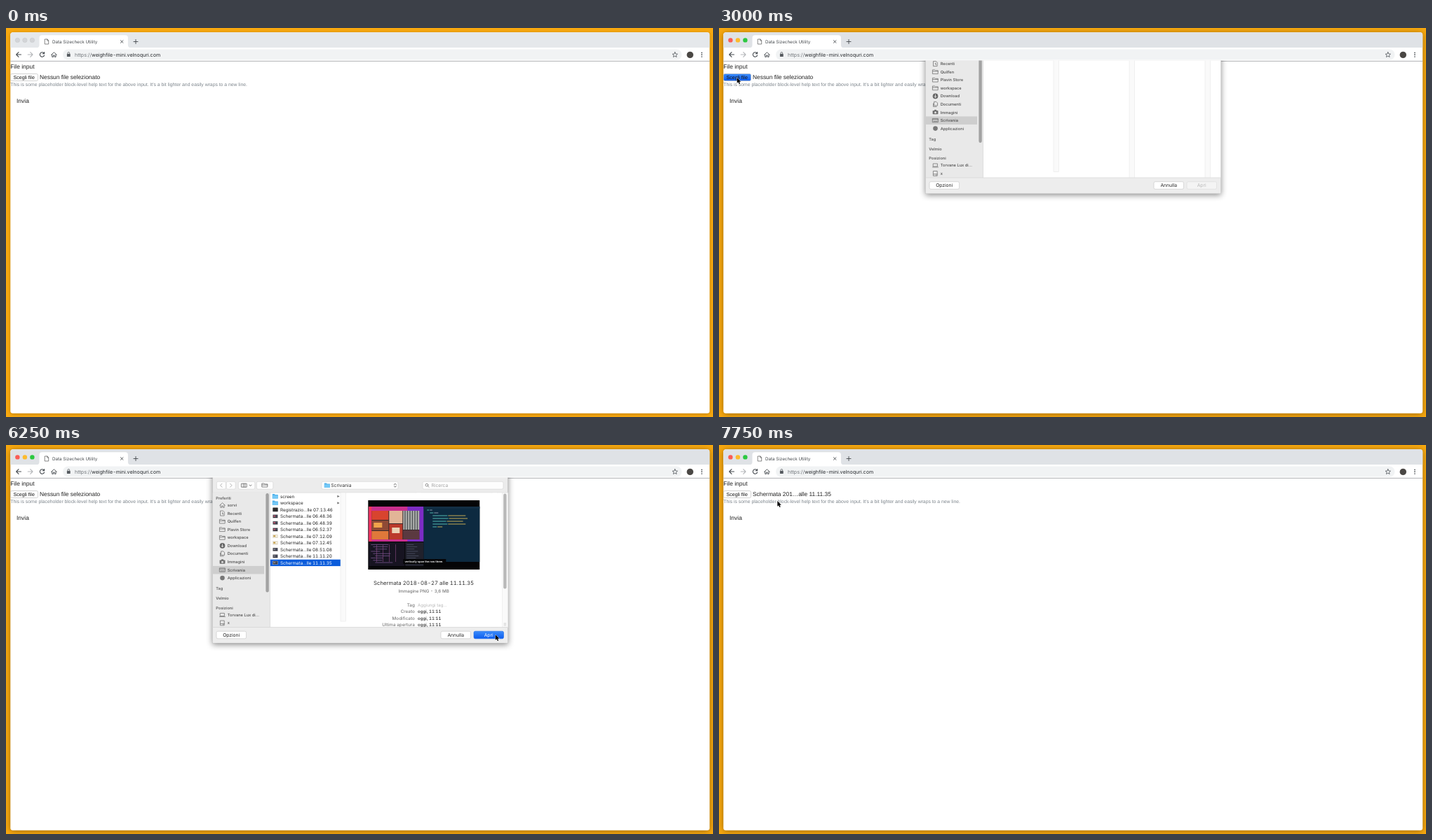
Recreate the animation shown at these times as an HTML page. Size 1008 by 556 pixels, loop 8000 ms.

```html
<!DOCTYPE html>
<html lang="it">
<head>
<meta charset="utf-8">
<title>File upload</title>
<style>
html, body { margin: 0; width: 100%; height: 100%; overflow: hidden; background: #f9a90f; }
svg { display: block; width: 100vw; height: 100vh; }
text { font-family: Inter, sans-serif; font-variant-numeric: tabular-nums; text-rendering: geometricPrecision; white-space: pre; }
.page text { font-family: "Liberation Sans", Arial, sans-serif; }
.line { fill: none; stroke-linecap: round; stroke-linejoin: round; }
</style>
</head>
<body>
<svg id="stage" viewBox="0 0 1008 556"></svg>
<script>
const LOOP = 8000, STEP = 250;

// Markup helpers; text is placed by the middle of its capitals.
const text = (x, y, size, str, fill = '#222', more = '') =>
  `<text x="${x}" y="${y + size * .36}" font-size="${size}" fill="${fill}" ${more}>${str}</text>`;
const rect = (x, y, w, h, fill, r = 0, more = '') =>
  `<rect x="${x}" y="${y}" width="${w}" height="${h}" rx="${r}" fill="${fill}" ${more}/>`;
const dot = (x, y, r, fill, more = '') => `<circle cx="${x}" cy="${y}" r="${r}" fill="${fill}" ${more}/>`;
const line = (d, stroke = '#444', width = 1, x = 0, y = 0) =>
  `<path class="line" d="${d}" stroke="${stroke}" stroke-width="${width}" transform="translate(${x} ${y})"/>`;
const group = (id, body, more = '') => `<g id="${id}" ${more}>${body}</g>`;
const edge = (color, width = .6) => `stroke="${color}" stroke-width="${width}"`;
const middle = 'text-anchor="middle"', end = 'text-anchor="end"';
const medium = 'font-weight="500"', bold = 'font-weight="600"';

const button = (x, label, fill, color, border) =>
  rect(x, 266.2, 42.5, 10.6, fill, 2, edge(border)) +
  text(x + 21.2, 271.4, 6.7, label, color, middle);

const folder = (x, y) =>
  `<path d="M${x - 4} ${y - 3.3}h3l1 1h4v5.4h-8z" fill="#4fb0ea"/>` +
  rect(x - 4, y - 1.4, 8, 4.6, '#74c8f6', .5);

function browser() {
  const lights = colors => colors.map((c, i) => dot(16.4 + i * 10.5, 17.4, 3.2, c)).join('');
  return rect(6.3, 6.3, 996.9, 544.4, '#fff', 3.5, 'id="frame"') +
    `<path id="strip" d="M6.3 28V9.8a3.5 3.5 0 0 1 3.5-3.5h989.9a3.5 3.5 0 0 1 3.5 3.5V28z"/>` +
    group('idle', [0, 1, 2].map(i => dot(16.4 + i * 10.5, 17.4, 3.2, '#d3d5d8', edge('#c4c6c9', .5))).join('')) +
    group('active', lights(['#fb5c55', '#fcbb2d', '#2bc840'])) +
    `<path d="M43.5 28.2q4 0 4-4V14q0-3.7 4-3.7h118.400q4 0 4 3.700v10.200q0 4 4 4z" fill="#fff"/>` +
    line('M-2.400-3.500H1L2.700-1.700V3.500H-2.400zM.8-3.400v2h1.800', '#555', .7, 58, 19.5) +
    text(66, 19.5, 6.25, 'Data Sizecheck Utility', '#45494d') +
    line('M-1.800-1.800 1.800 1.800M1.800-1.800-1.800 1.800', '#45494d', .9, 165.2, 19.5) +
    line('M-3 0H3M0-3V3', '#45494d', .9, 185, 19.5) +
    line('M3.500 0H-3.300M0-3.300-3.300 0 0 3.300', '#454a4f', 1.1, 18, 38) +
    line('M-3.500 0H3.300M0-3.300 3.300 0 0 3.300', '#b4b6b9', 1.1, 34.700, 38) +
    line('M2.800-1.700A3.200 3.200 0 1 0 3.100 1M3.100-3.500V-1.200H.8', '#454a4f', 1.1, 51.500, 38) +
    line('M-3.800.3 0-3.300 3.800.3M-2.700-.5V3.400H-.9V1H.9V3.400H2.700V-.5', '#454a4f', .9, 68.400, 38) +
    rect(81, 30.6, 882.5, 15, '#f1f3f4', 7.5) +
    rect(86.9, 37, 4.8, 4, '#555a5f', .6) + line('M-1.300 0V-1.200a1.300 1.300 0 0 1 2.600 0V0', '#555a5f', .8, 89.3, 37) +
    text(98, 38.2, 7.1, '<tspan fill="#70757a">https://</tspan>weighfile-mini.velnoquri.com', '#25282c') +
    line('M0-3.700 1.100-1.200 3.700-1 1.700.8 2.300 3.300 0 2-2.300 3.300-1.700.8-3.700-1-1.100-1.200z', '#50555a', .8, 953.8, 38.2) +
    dot(975.3, 38.4, 4.7, '#4a4744') +
    [-2.8, 0, 2.8].map(d => dot(992, 38.2 + d, .85, '#454a4f')).join('') +
    rect(6.3, 46.9, 996.9, .9, '#a9aaac');
}

function page() {
  return text(6.3, 54.5, 8.45, 'File input') +
    rect(6.5, 65.5, 39, 10, '#fff', 2, `id="choose" ${edge('#b5b5b5')}`) +
    text(10.5, 70.4, 7.1, 'Scegli file', '#111') +
    text(48, 69.8, 8.4, '', '#222', 'id="chosen"') +
    text(6.3, 80.9, 6.82, "This is some placeholder block-level help text for the above input. It's a bit lighter and easily wraps to a new line.", '#7d858c') +
    text(15, 104.4, 8.45, 'Invia');
}

function sidebar() {
  const folderLine = 'M-3.700-2.800H-1L0-1.900H3.700V2.900H-3.700zM-3.700-.7H3.700';
  const places = [
    ['sorvi', 'M-3.800.2 0-3.400 3.800.2M-2.700-.5V3.300H-.8V1H.8V3.300H2.700V-.5'],
    ['Recenti', 'M-2.600-3.500H1L2.600-1.900V3.500H-2.600zM0-1V1H1.300'],
    ['Quilfen', folderLine], ['Plavin Store', folderLine], ['workspace', folderLine],
    ['Download', ''],
    ['Documenti', 'M-3-1V3.500H1.700M-1.500-3.500H1.300L3-1.800V2H-1.500z'],
    ['Immagini', ''],
    ['Scrivania', 'M-3.800-2.700H3.800V2.700H-3.800zM-3.800-1.300H3.800M-2.500 1.300H2.500'],
    ['Applicazioni', '']
  ];
  let out = rect(294.8, 68, 81.6, 193, '#e9e9e9') + rect(295, 172.9, 73, 11.5, '#cecece') +
    rect(370.4, 69, 4.4, 141.5, '#a2a2a2', 2.2) + rect(376.2, 68, .6, 193, '#d2d2d2');
  places.forEach(([name, icon], i) => {
    const y = 86 + i * 11.57;
    out += line(icon, '#666', .7, 308.5, y) + text(315.7, y, 5.7, name, '#4c4c4c', medium);
  });
  out += dot(308.5, 143.9, 3.8, '#666') + line('M0-2V1.800M-1.500.4 0 1.900 1.500.4', '#eee', .9, 308.5, 143.9) +
    rect(304.6, 164.4, 7.8, 5.4, '#707070', .8) + rect(307, 163.4, 3, 2, '#707070') + dot(308.5, 167.2, 1.5, '#ddd') +
    dot(308.5, 190.1, 3.3, '#777');
  [['Preferiti', 75.9], ['Tag', 205.4], ['Velmio', 219], ['Posizioni', 232.7]]
    .forEach(([name, y]) => out += text(299.3, y, 5.6, name, '#626262', bold));
  return out +
    line('M-2.900-2.400H2.900V1.700H-2.900zM-4 2.600H4', '#666', .7, 308.5, 242.8) +
    text(315.7, 242.8, 5.7, 'Torvane Lux di…', '#4c4c4c', medium) +
    line('M-2.700-3.400H2.700V3.400H-2.700zM-2.700 1H2.700M1 2.200H1.500', '#666', .7, 308.5, 254.4) +
    text(315.7, 254.4, 5.7, 'x', '#4c4c4c', medium);
}

function fileList() {
  const times = ['06.48.36', '06.48.39', '06.52.37', '07.12.09', '07.12.45', '08.51.08', '11.11.20', '11.11.35'];
  const names = ['screen', 'workspace', 'Registrazio…lle 07.13.46', ...times.map(t => `Schermata…lle ${t}`)];
  let out = rect(376.8, 163.7, 100, 9.4, '#0b5cdb', 0, 'id="picked"');
  names.forEach((name, i) => {
    const y = 73.4 + i * 9.5;
    if (i < 2) {
      out += folder(383.8, y) + `<path d="M472.400 ${y - 1.7}l3.200 1.700-3.200 1.700z" fill="#6d6d6d"/>`;
    } else if (i == 2) {
      out += rect(380.3, y - 2.9, 7.4, 5.8, '#2a2a2c', .5);
    } else {
      const pale = i == 6 || i == 7;
      out += rect(380.3, y - 2.4, 7.2, 4.8, pale ? '#e5dcc0' : '#34343c', 0, edge('#ddd', .4)) +
        rect(381.3, y - 1.2, 2.8, 1.9, pale ? '#c49b45' : i < 6 ? '#c65b75' : '#868790') +
        rect(384.3, y - .9, 2.2, 1.3, pale ? '#fff' : '#596583');
    }
    out += text(391, y, 6.3, name, '#222', i == 10 ? 'id="pickedName"' : '');
  });
  return out;
}

// Flat stand-in for the screenshot thumbnail.
function thumbnail() {
  let out = rect(0, 0, 159, 99, '#050507') + rect(1, 9, 80, 50, '#c92f8d') + rect(1, 9, 4, 50, '#f0365f') +
    rect(56, 9, 24, 50, '#7c2cc4') + rect(5, 15, 68, 41, '#37292b') +
    rect(5, 15, 24, 13, '#d8442e') + rect(30, 15, 19, 18, '#e2b597') + rect(50, 15, 23, 27, '#aeb0ad') +
    rect(5, 29, 24, 14, '#8f4a35') + rect(8, 32, 12, 7, '#f0a34b') +
    rect(30, 34, 19, 22, '#bb3a2b') + rect(34, 39, 11, 8, '#ebd1b4') +
    rect(50, 43, 23, 13, '#5b3940') + rect(5, 44, 24, 12, '#e0783a');
  for (let i = 0; i < 6; i++) out += rect(52 + i * 3.5, 15, 1.3, 27, '#4c5153');
  out += rect(79, 9, 80, 79, '#0d2a40') + rect(79, 9, 80, 3, '#132f45') +
    rect(1, 60, 51, 34, '#171421') + rect(53, 60, 26, 34, '#20212c');
  for (let i = 0; i < 7; i++) {
    const w = [7, 12, 50, 53, 46, 50, 14][i];
    out += rect(84 + (i > 1 ? 8 : i * 4), 13.5 + i * 4, w * .42, 1, '#52b7b0') +
      rect(85 + w * .42 + (i > 1 ? 8 : i * 4), 13.5 + i * 4, w * .5, 1, i > 1 ? '#c4a955' : '#8796a7');
  }
  for (let i = 0; i < 9; i++)
    out += rect(4 + i % 3 * 3, 63 + i * 3.2, 25 - i % 4 * 4, .8, '#76548f') +
      rect(55, 63 + i * 3.2, 10 + i * 5 % 9, .7, '#53596f');
  for (let i = 0; i < 4; i++) out += rect(12 + i * 9, 63, .6, 25, '#8b4b85');
  return out + rect(50, 84, 61, 7, '#050507') +
    text(79.5, 87.6, 3.9, 'vertically span the row three.', '#fff', `${middle} ${bold}`);
}

function preview() {
  const facts = [['Tag', 'Aggiungi tag…'], ['Creato', 'oggi, 11:11'], ['Modificato', 'oggi, 11:11'], ['Ultima apertura', 'oggi, 11:11']];
  return rect(485, 68.5, 230.3, 192, '#fff') +
    rect(707.6, 68.5, 7.7, 192, '#fafafa', 0, edge('#e6e6e6', .5)) + rect(709.2, 69.5, 4.4, 136, '#b9b9b9', 2.2) +
    line('M-1-2V2M1-2V2', '#aaa', .5, 711.4, 256.4) +
    group('image', thumbnail(), 'transform="translate(516.3 79)"') +
    text(595.6, 197.6, 7.75, 'Schermata 2018-08-27 alle 11.11.35', '#303030', middle) +
    text(595.6, 209, 6.2, 'Immagine PNG - 3,6 MB', '#777', `${middle} ${medium}`) +
    facts.map(([label, value], i) => {
      const y = 228.5 + i * 9.5;
      return text(582.8, y, 6.3, label, '#7c7c7c', `${end} ${medium}`) +
        text(587, y, 6.1, value, i ? '#2a2a2a' : '#b9b9b9', i ? medium : '');
    }).join('');
}

function sheet() {
  const box = (x, w) => rect(x, 52.3, w, 10.8, '#fdfdfd', 2, edge('#cdcdcd', .5));
  const band = (x, h) => rect(x, 68, 7.4, h, '#fafafa', 0, edge('#e4e4e4', .5));
  return rect(294.5, 20, 421, 263, '#ececec', 0, `${edge('#b9b9b9', .5)} style="filter:drop-shadow(0 2px 4px #0007)"`) +
    rect(376.5, 68, 338.8, 193, '#fff') +
    box(300.3, 13) + box(314.2, 13) +
    line('M1.200-2.500-1.200 0 1.200 2.500', '#aaa', .9, 306.8, 57.7) +
    line('M-1.200-2.500 1.200 0-1.200 2.500', '#aaa', .9, 320.8, 57.7) +
    box(331.3, 23.5) + line('M-3.700-2.500H3.700V2.500H-3.700zM-1.200-2.500V2.500M1.200-2.500V2.500', '#555', .7, 339.5, 57.7) +
    line('M-1.400-.6 0 .8 1.400-.6', '#555', .8, 348.5, 57.7) +
    box(357.3, 23.5) + line('M-3.800-2.500H-1L0-1.600H3.800V2.500H-3.800zM-3.800-.4H3.800', '#555', .7, 369, 57.5) +
    box(450, 109) + folder(457.8, 57.7) + text(463.3, 57.7, 6.7, 'Scrivania', '#333') +
    line('M-1.500-1 0-2.500 1.500-1M-1.500 1 0 2.500 1.500 1', '#444', .8, 554.8, 57.7) +
    box(594, 115) + line('M1.200 1.200 2.800 2.800M1.600-.3A1.900 1.900 0 1 1-2.200-.3 1.900 1.900 0 1 1 1.600-.3', '#666', .7, 600.3, 57.5) +
    text(606.5, 57.7, 6.7, 'Ricerca', '#a2a2a2') +
    rect(294.8, 67.8, 420.5, .6, '#cfcfcf') +
    band(477, 184) + band(585, 193) + band(693, 193) +
    sidebar() + group('files', fileList()) + group('preview', preview()) +
    rect(294.8, 260.4, 420.4, 22.4, '#ededed') + rect(294.8, 260.2, 420.4, .6, '#cfcfcf') +
    button(300, 'Opzioni', '#fff', '#222', '#c4c4c4') + button(620, 'Annulla', '#fff', '#222', '#c4c4c4') +
    group('openOff', button(667, 'Apri', '#f4f4f4', '#b8b8b8', '#dadada')) +
    group('openOn', button(667, 'Apri', 'url(#blue)', '#fff', '#1765e8'));
}

document.getElementById('stage').innerHTML =
  `<defs><linearGradient id="blue" x2="0" y2="1"><stop stop-color="#3b8cfa"/><stop offset="1" stop-color="#0b5cf0"/></linearGradient>
  <clipPath id="below"><path d="M6 46.500H1003V551H6z"/></clipPath></defs>` +
  rect(0, 0, 1008, 556, '#f9a90f') + browser() + group('content', page(), 'class="page"') +
  `<g clip-path="url(#below)">${group('sheet', sheet())}</g>` +
  `<path id="cursor" d="M0 0V7.700L1.800 6.200 3 9 4.400 8.400 3.200 5.700H5.500z" stroke="#fff" stroke-width=".7" paint-order="stroke"/>`;

const el = id => document.getElementById(id);
const show = (id, on) => el(id).style.display = on ? '' : 'none';
const at = (id, x, y) => el(id).setAttribute('transform', `translate(${x} ${y})`);

// Keys: time, then values; eased between neighbours.
const pointer = [[250, 173, 1], [1250, 25.7, 71], [3000, 25.7, 71], [3500, 401.3, 173], [4000, 401.3, 173],
  [4750, 405, 168], [5000, 405, 168], [5500, 610.3, 243], [6000, 697.8, 271], [6750, 697.8, 271],
  [7500, 100, 78], [7750, 83.3, 80]];
const slide = [[2500, -240], [3000, -46.5], [3250, 0], [6500, 0], [6750, -22.5], [7000, -240]];

function track(keys, t) {
  const i = keys.findIndex(k => k[0] > t);
  if (i < 1) return keys.at(i).slice(1);
  const a = keys[i - 1], b = keys[i], p = (t - a[0]) / (b[0] - a[0]), e = p * p * (3 - 2 * p);
  return a.slice(1).map((v, j) => v + (b[j + 1] - v) * e);
}

function draw() {
  const t = Math.floor(performance.now() % LOOP / STEP) * STEP;
  const active = t >= 1500, picked = t >= 5000, ready = t >= 5250;
  show('idle', !active);
  show('active', active);
  el('strip').setAttribute('fill', active ? '#dfe2e6' : '#e5e8eb');
  el('frame').style.filter = `drop-shadow(0 1.5px ${active ? '4px #0006' : '2.5px #0004'})`;
  el('choose').setAttribute('fill', t >= 2250 && t < 3250 ? 'url(#blue)' : '#fff');
  el('chosen').textContent = t < 7000 ? 'Nessun file selezionato' : 'Schermata 201…alle 11.11.35';
  show('sheet', t >= 2750 && t < 7000);
  at('sheet', 0, track(slide, t)[0]);
  show('files', t >= 3250);
  show('picked', picked);
  el('pickedName').setAttribute('fill', picked ? '#fff' : '#222');
  show('preview', ready);
  show('image', t >= 5750);
  show('openOn', ready);
  show('openOff', !ready);
  show('cursor', t >= 250);
  at('cursor', ...track(pointer, t));
  requestAnimationFrame(draw);
}
draw();
</script>
</body>
</html>
```
